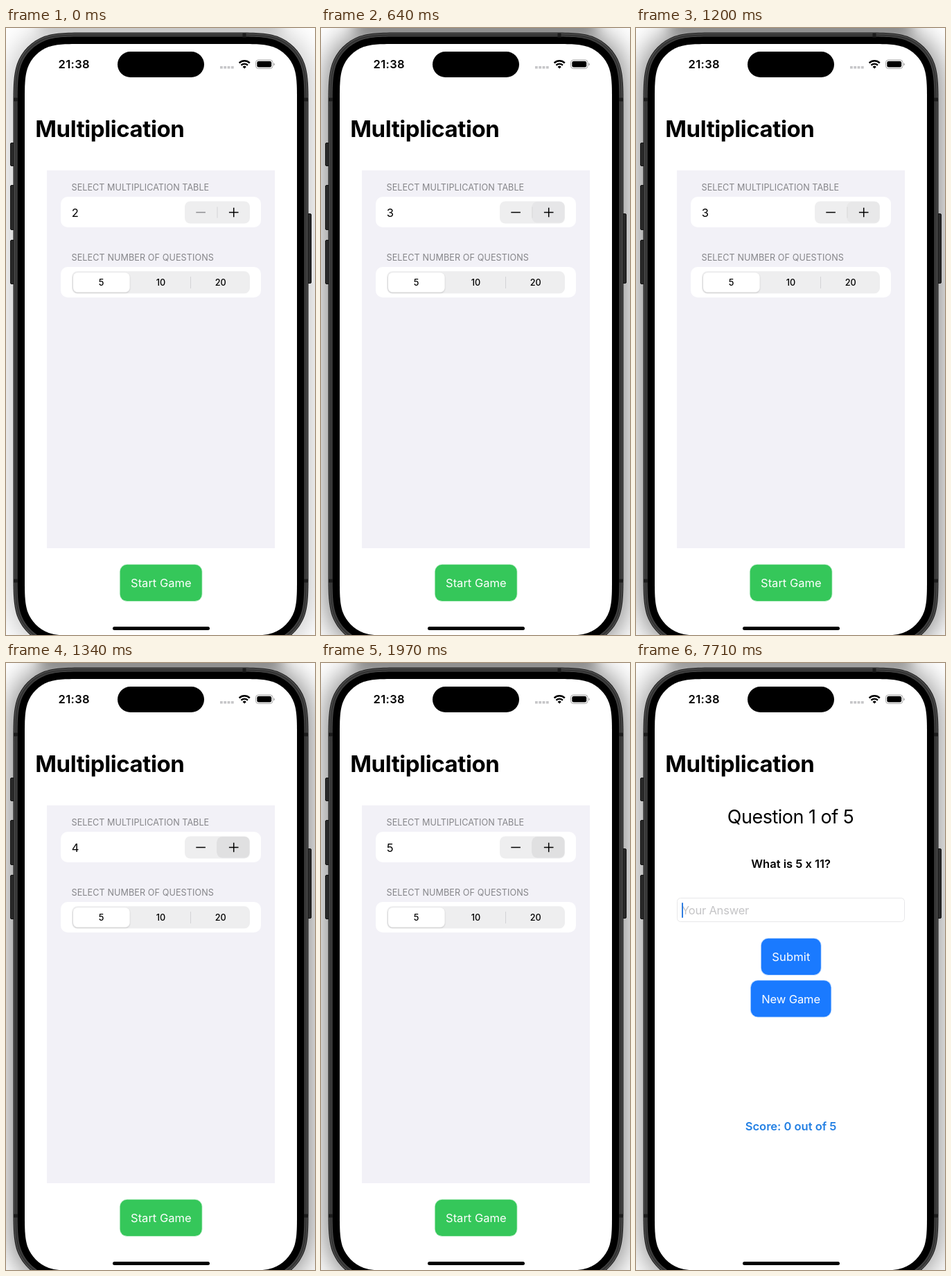
Animation of 446 by 874 pixels, one loop 8000 ms. Source, as an HTML page:

```html
<!DOCTYPE html>
<html lang="en">
<head>
<meta charset="utf-8">
<title>Multiplication</title>
<style>
  html, body { margin: 0; width: 100%; height: 100%; overflow: hidden; background: #fff; }
  svg { display: block; width: 446px; height: 874px; }
  text { font-family: Inter, "Liberation Sans", sans-serif; font-size: 16.5px; fill: #000; }
  .mid { text-anchor: middle; }
  .semi { font-weight: 600; }
  .title { font-size: 33px; font-weight: 700; letter-spacing: -.42px; }
  .head { font-size: 12.6px; fill: #858589; }
  .seg { font-size: 12.7px; font-weight: 500; text-anchor: middle; }
  .btn { fill: #fff; text-anchor: middle; }
  .pad { stroke-width: 1.6px; stroke-opacity: .3; }
  .green { fill: #35c75a; stroke: #35c75a; }
  .blue { fill: #1a7aff; stroke: #1a7aff; }
</style>
</head>
<body>
<svg viewBox="0 0 446 874" xmlns="http://www.w3.org/2000/svg">
  <defs>
    <filter id="wide" x="-20%" y="-20%" width="140%" height="140%"><feGaussianBlur stdDeviation="19"/></filter>
    <filter id="near" x="-20%" y="-100%" width="140%" height="300%"><feGaussianBlur stdDeviation="10"/></filter>
    <filter id="lift" x="-10%" y="-20%" width="120%" height="150%"><feDropShadow dx="0" dy="1" stdDeviation="1.2" flood-opacity=".2"/></filter>
  </defs>
  <rect width="446" height="874" fill="#fff"/>
  <g id="shadow">
    <path id="glow" filter="url(#wide)"/>
    <rect x="50" y="-30" width="346" height="44" filter="url(#near)"/>
  </g>

  <g fill="#2a2a2a" stroke="#111" stroke-width="1">
    <rect x="6.500" y="165.500" width="6" height="33" rx="1.500"/>
    <rect x="6.500" y="226.500" width="6" height="64" rx="1.500"/>
    <rect x="6.500" y="305.500" width="6" height="63" rx="1.500"/>
    <rect x="434.500" y="267.500" width="6" height="100" rx="1.500"/>
  </g>
  <g id="body"></g>
  <path d="M11 103h6M430 103h6M11 796h6M430 796h6M344 7.500v6" stroke="#1c1c1c" stroke-width="5"/>
  <path id="screen" fill="#fff"/>

  <rect x="161" y="34" width="125" height="37" rx="18.500"/>
  <text class="semi" x="75.500" y="58.300" letter-spacing=".4">21:38</text>
  <path d="M309 56.700h20" stroke="#c6c6c8" stroke-width="3.600" stroke-dasharray="3.800 1.500"/>
  <g fill="none" stroke="#000" stroke-width="2.300">
    <path d="M336.600 50.400A10.800 10.800 0 0 1 351.800 50.400"/>
    <path d="M339.400 53.600A6.900 6.900 0 0 1 349 53.600"/>
  </g>
  <path d="M344.200 58.600L341.600 55.900A3.700 3.700 0 0 1 346.800 55.900Z"/>
  <rect x="360.500" y="46" width="24.500" height="12.400" rx="3.800" fill="none" stroke="#a4a4a4"/>
  <rect x="362.300" y="47.800" width="20.900" height="8.800" rx="2.400"/>
  <path d="M386.300 50.200q1.500.6 1.500 2t-1.500 2z" fill="#a4a4a4"/>

  <text class="title" x="42.200" y="157">Multiplication</text>

  <g id="setup">
    <rect x="59" y="205" width="329" height="544" fill="#f2f1f7"/>
    <text class="head" x="94.500" y="234.200" letter-spacing=".05">SELECT MULTIPLICATION TABLE</text>
    <rect x="79" y="243" width="289" height="44" rx="10" fill="#fff"/>
    <text id="value" x="94.800" y="271.700">2</text>
    <rect x="258" y="249.500" width="94" height="32" rx="8" fill="#eeeeef"/>
    <path d="M305 257.500v16" stroke="#d3d3d6"/>
    <rect id="press" x="304.500" y="250" width="47" height="30.500" rx="7.500" fill="#e0e0e1"/>
    <path id="minus" d="M274.300 265.500h13.600" stroke-width="1.500"/>
    <path d="M321.900 265.500h13.600M328.700 258.700v13.600" stroke="#000" stroke-width="1.500"/>

    <text class="head" x="94.500" y="334.700" letter-spacing=".1">SELECT NUMBER OF QUESTIONS</text>
    <rect x="79" y="344" width="289" height="44" rx="10" fill="#fff"/>
    <rect x="95" y="350.300" width="257" height="32" rx="8" fill="#eeeeef"/>
    <rect x="97" y="352.300" width="81.500" height="28" rx="6.500" fill="#fff" filter="url(#lift)"/>
    <path d="M266.500 358v17" stroke="#d3d3d6"/>
    <text class="seg semi" x="137.700" y="371">5</text>
    <text class="seg" x="223.400" y="371">10</text>
    <text class="seg" x="309.700" y="371">20</text>

    <rect class="pad green" x="164.700" y="772.800" width="118" height="52.300" rx="10"/>
    <text class="btn" x="223.800" y="805">Start Game</text>
  </g>

  <g id="quiz">
    <text class="mid" x="223.100" y="231.400" style="font-size:27px" letter-spacing="-.5">Question 1 of 5</text>
    <text class="mid semi" x="223.600" y="294.600">What is 5 x 11?</text>
    <rect x="59.500" y="338.500" width="328" height="34" rx="5" fill="#fff" stroke="#e7e7e9"/>
    <text x="66" y="362" letter-spacing="-.2" style="fill:#c4c4c6">Your Answer</text>
    <rect id="caret" x="66" y="345" width="2" height="22" rx="1" fill="#2f7de1"/>
    <rect class="pad blue" x="180.800" y="396.800" width="86" height="52.200" rx="10"/>
    <text class="btn" x="223.900" y="429" letter-spacing=".2">Submit</text>
    <rect class="pad blue" x="165.800" y="457.200" width="115.600" height="52.200" rx="10"/>
    <text class="btn" x="223.600" y="489.500" letter-spacing="-.1">New Game</text>
    <text class="mid semi" x="223.600" y="673.300" style="fill:#227fe3">Score: 0 out of 5</text>
  </g>
  <rect x="154" y="862" width="140" height="5" rx="2.500"/>
</svg>
<script>
const $ = id => document.getElementById(id);
const SCREEN = { x: 27, y: 23, w: 393, h: 852, r: 55 };

// Rounded rectangle with smoothly flowing corners, grown outward by `grow`.
function squircle(grow) {
  const { x, y, w, h } = SCREEN;
  const r = SCREEN.r + grow;
  const L = x - grow, T = y - grow, R = x + w + grow, B = y + h + grow;
  const corner = [[1.5287, 0], [1.0885, 0], [.8684, 0], [.6315, .0749],
                  [.3728, .1691], [.1691, .3728], [.0749, .6315],
                  [0, .8684], [0, 1.0885], [0, 1.5287]];
  const back = [...corner].reverse();
  const part = (cx, cy, sx, sy, pts) => {
    const p = pts.map(([a, b]) => `${(cx + sx * a * r).toFixed(2)} ${(cy + sy * b * r).toFixed(2)}`);
    return `L${p[0]}C${p.slice(1).join(' ')}`;
  };
  const d = part(R, T, -1, 1, corner) + part(R, B, -1, -1, back) +
            part(L, B, 1, -1, corner) + part(L, T, 1, 1, back);
  return 'M' + d.slice(1) + 'Z';
}

$('screen').setAttribute('d', squircle(0));
$('glow').setAttribute('d', squircle(23));
$('body').innerHTML = [[16.5, '#171717'], [15.4, '#5a5a5a'], [14.4, '#353535'],
  [11.5, '#484848'], [10.4, '#000']]
  .map(([grow, fill]) => `<path d="${squircle(grow)}" fill="${fill}"/>`).join('');

// [start, stepper value, strength of the pressed state]
const TAPS = [[0, 2, 0], [640, 3, .5], [710, 3, 1],
              [1200, 3, .45], [1270, 4, .6], [1340, 4, 1],
              [1830, 4, .45], [1900, 5, .6], [1970, 5, 1]];
const LOOP = 8000, FOCUS = 500, START = 5190, CARET = 7710;

function draw(t) {
  const [, value, press] = TAPS.filter(s => s[0] <= t).pop();
  const playing = t >= START;
  $('setup').style.display = playing ? 'none' : '';
  $('quiz').style.display = playing ? '' : 'none';
  $('value').textContent = value;
  $('press').style.opacity = press;
  $('minus').setAttribute('stroke', value > 2 ? '#000' : '#8d8d90');
  $('caret').style.opacity = t >= CARET ? 1 : 0;
  $('shadow').style.opacity = t < FOCUS ? .22 : playing ? .4 : .46;
}

function tick() {
  draw(performance.now() % LOOP);
  requestAnimationFrame(tick);
}
tick();
</script>
</body>
</html>
```
